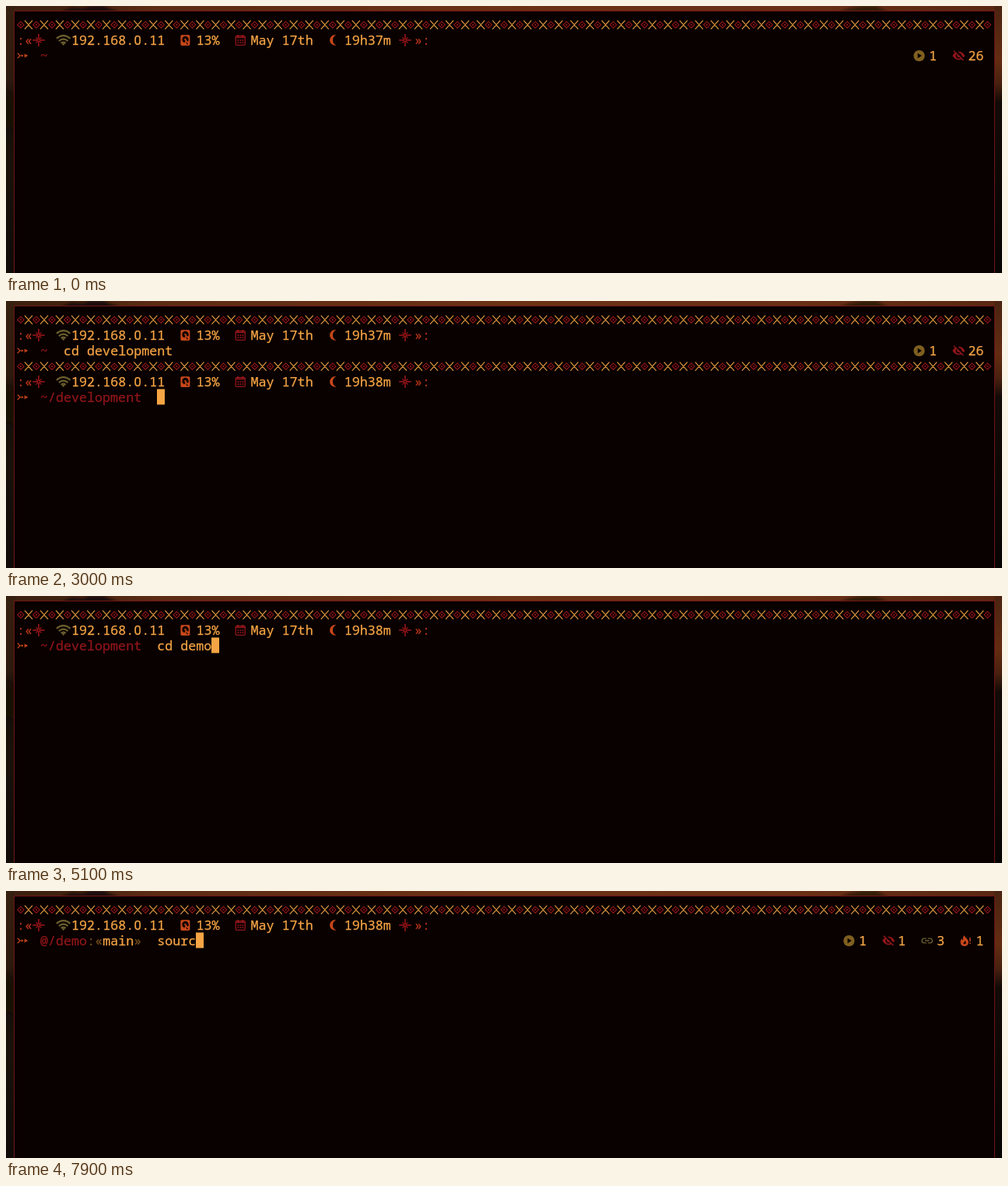
Animation of 1280x344 px, one loop 8 s. Source, as an HTML page:

```html
<!DOCTYPE html>
<html lang="en">
<head>
<meta charset="utf-8">
<title>Terminal prompt</title>
<style>
  html, body { margin: 0; width: 100%; height: 100%; overflow: hidden; background: #090000; }
  svg { display: block; width: 100%; height: 100%; }
  text {
    font: 16.7px "Noto Sans Mono", "DejaVu Sans Mono", monospace;
    white-space: pre; fill: currentColor; stroke: currentColor; stroke-width: .25px;
  }
  .zero { font-family: Roboto, sans-serif; letter-spacing: .32px; }
  .line { fill: none; stroke: currentColor; }
  .hole { fill: #090000; }
</style>
</head>
<body>
<svg viewBox="0 0 1280 344" preserveAspectRatio="none">
  <defs>
    <linearGradient id="sky">
      <stop offset="0" stop-color="#3c2010"/>
      <stop offset=".05" stop-color="#40220f"/>
      <stop offset=".15" stop-color="#5c2c14"/>
      <stop offset=".5" stop-color="#6c3216"/>
      <stop offset=".8" stop-color="#693016"/>
      <stop offset="1" stop-color="#592812"/>
    </linearGradient>
    <linearGradient id="west" x2="0" y2="1">
      <stop offset="0" stop-color="#36200f"/>
      <stop offset=".28" stop-color="#2c190d"/>
      <stop offset=".36" stop-color="#140d08"/>
      <stop offset=".6" stop-color="#1a110a"/>
      <stop offset="1" stop-color="#0f0a07"/>
    </linearGradient>
    <linearGradient id="east" x2="0" y2="1">
      <stop offset="0" stop-color="#4a2411"/>
      <stop offset=".2" stop-color="#632c12"/>
      <stop offset=".29" stop-color="#48210f"/>
      <stop offset=".36" stop-color="#120a06"/>
      <stop offset="1" stop-color="#060403"/>
    </linearGradient>
    <filter id="soft"><feGaussianBlur stdDeviation="1.5"/></filter>
  </defs>
  <rect width="1280" height="8" fill="url(#sky)"/>
  <rect width="11" height="344" fill="url(#west)"/>
  <rect x="1270" width="10" height="344" fill="url(#east)"/>
  <g fill="#1a0e08" filter="url(#soft)">
    <path d="M70 8L84 2L98 3L108 0H126L132 3L146 8Z"/>
    <path d="M1070 8L1084 3L1100 0H1118L1134 8Z" opacity=".6"/>
    <path d="M0 108L6 112L10 124V160L4 154L0 158Z" opacity=".7"/>
  </g>
  <rect x="10.5" y="6.5" width="1260" height="345" fill="#090000" stroke="#711414"/>
  <g id="screen"></g>
</svg>
<script>
const CELL = 10.02, LEFT = 13.95, ROW = 20, TOP = 13.5, LOOP = 8000;
const AMBER = '#f6a545', RED = '#901619', CRIMSON = '#a3161a', ORANGE = '#c64619',
      RUST = '#b8351a', OLIVE = '#6c5f2e', GOLD = '#80601f', BROWN = '#78501e';

// Icons are drawn from the top left corner of their cell.
const icons = {
  star: '<path class="line" d="M8 2.6V18.4M.2 10.5H15.8" stroke-width="1.5"/>' +
    '<path class="line" d="M4.4 6.9L11.6 14.1M11.6 6.9L4.4 14.1" stroke-width="1.2"/>' +
    '<circle class="hole" cx="8" cy="10.5" r=".9"/>',
  wifi: '<path class="line" d="M.9 8.3Q9.7 .9 18.5 8.3M3.9 11.6Q9.7 6.5 15.5 11.6M6.7 14.4Q9.7 11.8 12.7 14.4" stroke-width="2.2"/>' +
    '<path d="M7.6 15.2Q9.7 13.6 11.8 15.2L9.7 17.4Z" fill="currentColor"/>',
  disk: '<rect y="3.8" width="12" height="13.6" rx="1.6" fill="currentColor"/>' +
    '<path class="hole" d="M6 5.2A4.4 4.4 0 0 1 9.4 12.4L6.6 9.6L5.2 13.8A4.4 4.4 0 0 1 6 5.2ZM6.4 12L9.8 15.6L8.4 16.2Z"/>' +
    '<circle cx="6" cy="9.6" r="1.2" fill="currentColor"/>',
  calendar: '<rect class="line" x=".7" y="5.2" width="12" height="11.6" rx="1" stroke-width="1.3"/>' +
    '<path class="line" d="M.7 6.8H12.7M3.6 3.4V6M9.8 3.4V6" stroke-width="1.8"/>' +
    '<path class="line" d="M3 10.6H11M3 13.6H11" stroke-width="1.7" stroke-dasharray="1.7 1.3"/>',
  moon: '<path d="M9.6 4A6.7 6.7 0 1 0 9.6 17A7 7 0 0 1 9.6 4Z" fill="currentColor"/>',
  arrow: '<path class="line" d="M.8 7.2L4.2 10.5L.8 13.8M4.4 10.5H8.2M9 10.5H13.4" stroke-width="1.2"/>' +
    '<path d="M9.4 7.8L14.2 10.5L9.4 13.2L10.6 10.5ZM6 8.8L8.2 10.5L6 12.2Z" fill="currentColor"/>',
  play: '<circle cx="7.3" cy="10.6" r="7.2" fill="currentColor"/><path class="hole" d="M5.4 7.2L10.6 10.6L5.4 14Z"/>',
  eye: '<path d="M0 10.6Q3 5.2 8 5.2T16 10.6Q13 16 8 16T0 10.6Z" fill="currentColor"/>' +
    '<circle class="hole" cx="8" cy="10.6" r="3.7"/><circle cx="8" cy="10.6" r="2.2" fill="currentColor"/>' +
    '<path d="M2.6 3.4L15.2 16" stroke="#090000" stroke-width="3.2"/>' +
    '<path class="line" d="M1.6 4.2L14.2 16.8" stroke-width="1.5"/>',
  link: '<path class="line" d="M6.6 7.6H3.7A2.9 2.9 0 0 0 3.7 13.4H6.6M8.4 7.6H11.3A2.9 2.9 0 0 1 11.3 13.4H8.4M4.8 10.5H10.2" stroke-width="1.4"/>',
  fire: '<path d="M5.2 3.4C5.4 6.4 10.6 8 10.6 12.6A5.2 5 0 0 1 .2 12.6C.2 10.6 1 9 2.2 7.8Q2.4 9.6 3.6 10C3.2 7.4 3.6 5 5.2 3.4Z" fill="currentColor"/>' +
    '<path class="hole" d="M5.8 10.4Q8.2 12 7.2 14.2A2.2 2.2 0 0 1 3.6 13.6Q5.8 13 5.8 10.4Z"/>' +
    '<path class="line" d="M12.6 6.4V11.6M12.6 13V14.8" stroke-width="1.5"/>'
};

const px = col => LEFT + col * CELL;
const py = row => TOP + row * ROW;

function text(col, row, str, color = AMBER) {
  const body = str.replace('.0.', '.<tspan class="zero" dx=".32">0</tspan>.');
  return `<text x="${px(col)}" y="${py(row) + 16.5}" color="${color}">${body}</text>`;
}
const icon = (col, row, name, color) =>
  `<g transform="translate(${px(col)} ${py(row)})" color="${color}">${icons[name]}</g>`;
const cursor = (col, row) =>
  `<rect x="${Math.floor(px(col))}" y="${py(row)}" width="10" height="${ROW}" fill="${AMBER}"/>`;

function border(row) {
  const y = py(row) + 10.7;
  let cross = '', diamond = '', dots = '';
  for (let col = 0; col < 125; col++) {
    const x = px(col) + CELL / 2;
    if (col % 2) {
      cross += `M${x - 5} ${y - 5.6}l10 11.2m0 -11.2l-10 11.2`;
    } else {
      diamond += `M${x - 4.2} ${y}l4.2 -4.2l4.2 4.2l-4.2 4.2z`;
      dots += `M${x - 1} ${y}h2`;
    }
  }
  return `<path d="${cross}" fill="none" stroke="#dc983e" stroke-width="1.2"/>` +
    `<path d="${diamond}" fill="none" stroke="${RED}" stroke-width="1.1"/>` +
    `<path d="${dots}" stroke="${RED}" stroke-width="2"/>`;
}

function header(row, clock) {
  const r = row + 1;
  return border(row) +
    text(0, r, ':«', RUST) + icon(2, r, 'star', CRIMSON) +
    icon(5, r, 'wifi', OLIVE) + text(7, r, '192.168.0.11') +
    icon(21, r, 'disk', ORANGE) + text(23, r, '13%') +
    icon(28, r, 'calendar', RED) + text(30, r, 'May 17th') +
    icon(40, r, 'moon', ORANGE) + text(42, r, clock) +
    icon(49, r, 'star', CRIMSON) + text(51, r, '»:', RUST);
}

const counts = {
  home: [[115, 'play', GOLD, '1'], [120, 'eye', RED, '26']],
  dev: [],
  demo: [[106, 'play', GOLD, '1'], [111, 'eye', RED, '1'], [116, 'link', OLIVE, '3'], [121, 'fire', ORANGE, '1']]
};
const inputCol = { home: 6, dev: 18, demo: 18 };

function prompt(row, place, typed, blink) {
  const col = inputCol[place];
  let out = icon(0, row, 'arrow', ORANGE);
  if (place === 'demo') {
    out += text(3, row, '@/demo', RED) + text(9, row, ':«', BROWN) +
      text(11, row, 'main') + text(15, row, '»', BROWN);
  } else {
    out += text(3, row, place === 'home' ? '~' : '~/development', RED);
  }
  for (const [c, name, color, n] of counts[place])
    out += icon(c, row, name, color) + text(c + 2, row, n);
  out += text(col, row, typed);
  return blink ? out + cursor(col + typed.length, row) : out;
}

const block = (row, clock, place, typed, blink) =>
  header(row, clock) + prompt(row + 2, place, typed, blink);

const EARLY = '19h37m', LATE = '19h38m';
const scenes = {
  home: (typed, blink) => block(0, EARLY, 'home', typed, blink),
  homeDone: typed => block(0, EARLY, 'home', typed) + block(3, LATE, 'dev', '', true),
  dev: (typed, blink) => block(0, LATE, 'dev', typed, blink),
  devRun: typed => block(0, LATE, 'dev', typed) + cursor(0, 3),
  devDone: typed => block(0, LATE, 'dev', typed) + block(3, LATE, 'demo', '', true),
  demo: (typed, blink) => block(0, LATE, 'demo', typed, blink)
};

// start time, scene, typed text, cursor shown
const steps = [
  [0, 'home', '', false], [300, 'home', '', true], [800, 'home', '', false],
  [1100, 'home', 'c', true], [1500, 'home', 'cd', true], [1700, 'home', 'cd ', true],
  [1900, 'home', 'cd d', true], [2000, 'home', 'cd de', true], [2200, 'home', 'cd dev', true],
  [2700, 'home', 'cd development/', true], [3000, 'homeDone', 'cd development'],
  [3600, 'dev', '', true], [4100, 'dev', '', false],
  [4300, 'dev', 'c', true], [4400, 'dev', 'cd', true], [4500, 'dev', 'cd ', true],
  [4700, 'dev', 'cd d', true], [4800, 'dev', 'cd de', true],
  [5000, 'dev', 'cd dem', true], [5100, 'dev', 'cd demo', true],
  [5600, 'devRun', 'cd demo'], [5700, 'devDone', 'cd demo'],
  [6200, 'demo', '', true], [6900, 'demo', '', false],
  [7100, 'demo', 's', true], [7200, 'demo', 'so', true], [7400, 'demo', 'sou', true],
  [7600, 'demo', 'sour', true], [7900, 'demo', 'sourc', true]
];

const screenEl = document.getElementById('screen');
const start = performance.now();
let shown = null;

function draw() {
  const t = Math.max(0, performance.now() - start) % LOOP;
  const step = steps.findLast(s => s[0] <= t);
  if (step !== shown) {
    shown = step;
    const [, scene, typed, blink] = step;
    screenEl.innerHTML = scenes[scene](typed, blink);
  }
  requestAnimationFrame(draw);
}
draw();
</script>
</body>
</html>
```
